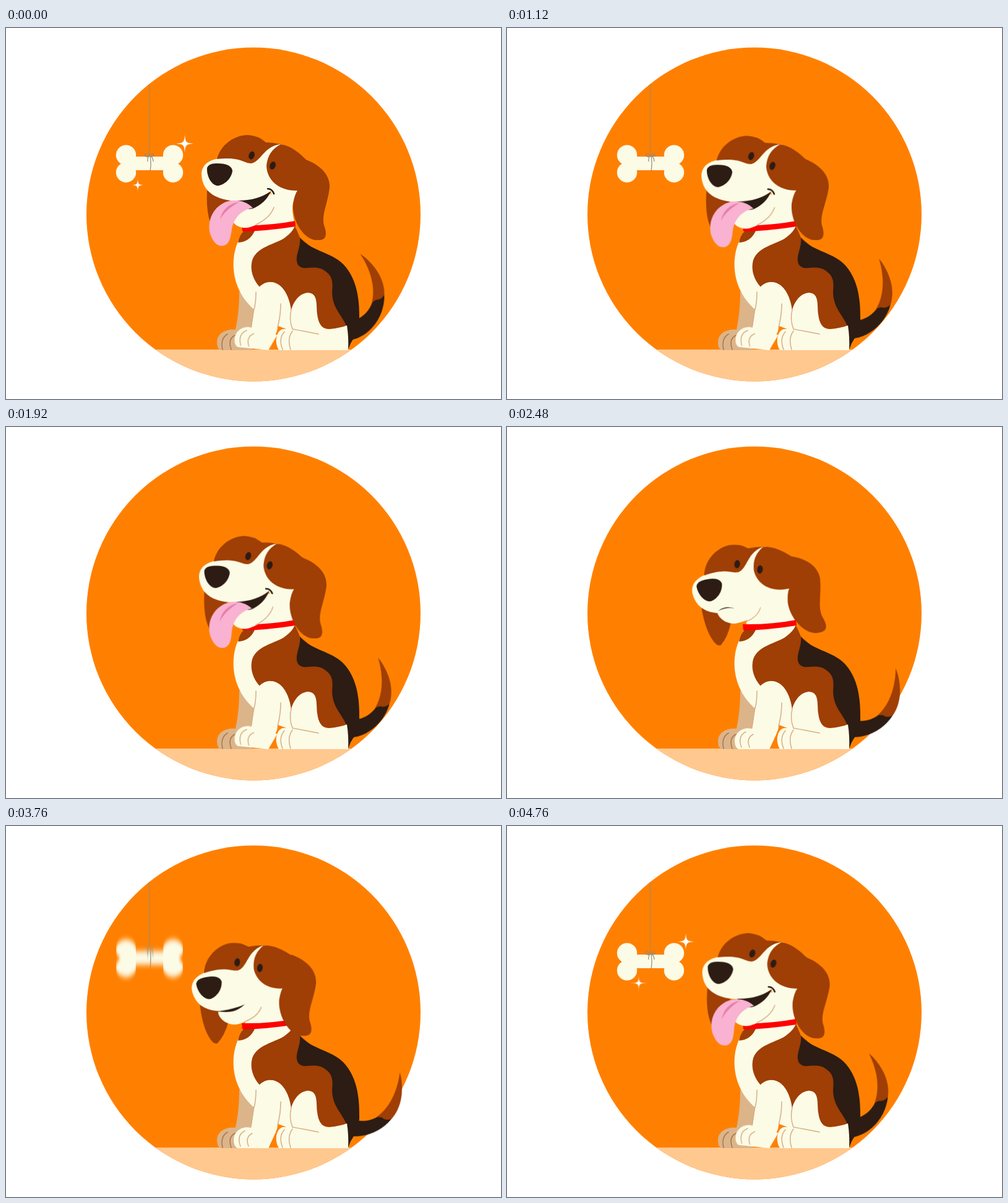
Write an HTML page without scripts that moves like this. It is 800 by 600 pixels and loops after 4.8 s.

```html
<!DOCTYPE html>
<html lang="en">
<head>
<meta charset="utf-8">
<title>Puppy and bone</title>
<style>
html, body { margin: 0; width: 100%; height: 100%; overflow: hidden; background: #fff; }
svg { display: block; width: 100vw; height: 100vh; }

.cream { fill: #fcfbe6; }
.brown { fill: #9f3e05; }
.dark { fill: #2c1c13; }
.tan { fill: #dcb48a; }
.line { fill: none; stroke: #d6ae84; stroke-width: 1.5; stroke-linecap: round; }
.toes { stroke: #a8764c; }

.move { animation: 4.8s ease-in-out infinite; }
.head { transform-origin: 455px 325px; animation-name: nod; }
.ear { transform-origin: 485px 225px; animation-name: near-ear; }
.far-ear { transform-origin: 350px 225px; animation-name: far-ear; }
.tail { transform-origin: 560px 468px; animation-name: wag; animation-delay: -4.76s; }
.paw { transform-origin: 424px 520px; animation-name: tap; }
.far-paw { transform-origin: 398px 520px; animation-name: far-tap; }
.tongue { transform-origin: 392px 284px; animation-name: pant; }
.jaw { animation-name: jaw; }
.cheek { animation-name: cheek; }
.mouth { animation-name: mouth; }
.corner { animation-name: corner; }
.bone { animation-name: hang; }
.sharp { animation-name: sharp; animation-timing-function: step-end; }
.blurred { animation-name: blurred; animation-timing-function: step-end; }
.star-a { transform-origin: 289px 187px; animation-name: star-a; }
.star-b { transform-origin: 213px 254px; animation-name: star-b; }
.star-c { transform-origin: 208px 185px; animation-name: star-c; }

@keyframes nod {
  0%, 12.5%, 25%, 37.5%, 87.5%, 100% { transform: rotate(0deg); }
  6.25%, 18.75%, 31.25%, 43.75% { transform: rotate(-8deg); }
  47.2% { transform: rotate(-3deg); }
  53.3% { transform: rotate(-14.5deg); }
  75% { transform: rotate(-14deg); }
  93.4% { transform: rotate(-8.5deg); }
}
@keyframes near-ear {
  0%, 100% { transform: rotate(0deg); }
  4.2%, 19%, 94% { transform: rotate(8deg); }
  9.4%, 25%, 38%, 84%, 99.17% { transform: rotate(2deg); }
  14.17%, 31.67%, 44% { transform: rotate(7.3deg); }
  51.67% { transform: rotate(1deg); }
  58%, 78.33% { transform: rotate(13deg); }
  90% { transform: rotate(4deg); }
}
@keyframes far-ear {
  0%, 51.67%, 70%, 100% { transform: rotate(0deg); }
  5%, 84% { transform: rotate(7deg); }
  11%, 25%, 38%, 99.17% { transform: rotate(1.5deg); }
  14.17%, 19%, 31.67%, 44%, 90% { transform: rotate(6deg); }
  78.33% { transform: rotate(2deg); }
}
@keyframes wag {
  0%, 8.33%, 16.67%, 25%, 33.33%, 41.67%, 83.33%, 91.67%, 100% { transform: rotate(-1.5deg); }
  4.17%, 12.5%, 20.83%, 29.17%, 37.5%, 45.83%, 87.5%, 95.83% { transform: rotate(27deg); }
  55.83%, 76.67% { transform: rotate(43deg); }
}
@keyframes tap {
  0%, 8.3%, 15.8%, 25%, 32.5%, 41.7%, 84%, 91.7%, 98.8%, 100% { transform: rotate(6deg); }
  12%, 14.5%, 28.7%, 31.2%, 45%, 80%, 95.3%, 97.5% { transform: rotate(0deg); }
}
@keyframes far-tap {
  0%, 8.3%, 15.8%, 25%, 32.5%, 91.7%, 98.8%, 100% { transform: rotate(0deg); }
  12%, 14.5%, 28.7%, 31.7%, 95.3%, 97.5% { transform: rotate(5deg); }
}
@keyframes pant {
  0%, 14.17%, 24%, 40%, 46%, 100% { transform: none; }
  7%, 19% { transform: rotate(-3deg); }
  31.67% { transform: rotate(4deg); }
  49.5%, 80% { transform: scale(0); }
  90% { transform: scale(.87); }
  99.17% { transform: rotate(-3deg); }
}
@keyframes jaw {
  0%, 46.5%, 83%, 100% { d: path("M366 312C370 320 380 324 390 323C410 319 428 305 433 290L428 268L385 285Z"); }
  51%, 75% { d: path("M348 274C349 288 362 298 374 299C392 300 410 294 418 283L428 268L352 270Z"); }
  78.33% { d: path("M350 279C350 292 362 303 376 304C392 304 412 296 420 285L428 268L355 275Z"); }
}
@keyframes cheek {
  0%, 46.5%, 83%, 100% { d: path("M433 290Q427 307 404 318"); }
  51%, 75% { d: path("M418 283Q410 297 389 300"); }
  78.33% { d: path("M420 285Q411 299 390 302"); }
}
@keyframes mouth {
  0%, 46.5%, 83%, 100% { d: path("M372 279Q405 280 428 264Q420 283 399 292Q385 296 372 279Z"); }
  51%, 75% { d: path("M350 273Q363 266 377 275Q370 271 363 271.5Q356 271 350 273Z"); }
  78.33% { d: path("M350 277Q376 279 395 275Q385 281 375 282Q362 282 350 277Z"); }
}
@keyframes corner {
  0%, 47%, 83%, 100% { opacity: 1; }
  49%, 80% { opacity: 0; }
}
@keyframes hang {
  0%, 24.2%, 86.7%, 100% { transform: translateY(0); }
  30.83%, 80.92% { transform: translateY(38px); }
  40%, 71.67% { transform: translateY(-235px); }
}
@keyframes sharp {
  0%, 29.6%, 80.2% { opacity: 1; }
  25.8%, 31.3% { opacity: 0; }
}
@keyframes blurred {
  0%, 29.6%, 80.2% { opacity: 0; }
  25.8%, 31.3% { opacity: 1; }
}
@keyframes star-a {
  0%, 100% { transform: scale(1); }
  2.5% { transform: scale(1.25); }
  9%, 94% { transform: scale(0); }
  99.17% { transform: scale(.94); }
}
@keyframes star-b {
  0%, 100% { transform: scale(1); }
  6%, 94% { transform: scale(0); }
  98.5% { transform: scale(1.07); }
}
@keyframes star-c {
  0%, 99.17%, 100% { transform: scale(.08); }
  .8%, 86% { transform: scale(0); }
  90% { transform: scale(1); }
  92.5% { transform: scale(1.25); }
}
</style>
</head>
<body>
<svg viewBox="0 0 800 600">
  <defs>
    <clipPath id="disc"><circle cx="400" cy="301.5" r="270"/></clipPath>
    <filter id="smear" x="-10%" y="-10%" width="120%" height="120%"><feGaussianBlur stdDeviation="0 5"/></filter>
    <g id="bone">
      <path d="M231.5 -160V205" fill="none" stroke="#8f897b" stroke-width="1.1" opacity=".75"/>
      <g class="cream">
        <circle cx="194" cy="205.5" r="16.2"/><circle cx="194" cy="233.5" r="16.2"/>
        <circle cx="270" cy="205.5" r="16.2"/><circle cx="270" cy="233.5" r="16.2"/>
        <path d="M194 208H270V230H194Z"/>
      </g>
      <path d="M232 207q-8-7-8-1q3 4 8 1q7-7 7-1q-3 3-7 1M231 207q-3 5-2 9M234 207q4 4 4 9M233 208q2 10 0 23" fill="none" stroke="#8f897b" stroke-width="1.2"/>
    </g>
    <path id="star" d="M0-14C1-2 2-1 14 0C2 1 1 2 0 14C-1 2-2 1-14 0C-2-1-1-2 0-14Z" fill="#fff"/>
    <path id="thin-star" d="M0-16C0 0 0 0 16 0C0 0 0 0 0 16C0 0 0 0-16 0C0 0 0 0 0-16Z" fill="#fff"/>
  </defs>

  <g clip-path="url(#disc)">
    <path d="M130 30H670V573H130Z" fill="#ff8000"/>
    <path d="M130 520H670V573H130Z" fill="#ffc88f"/>
    <g class="move bone">
      <use class="move sharp" href="#bone"/>
      <use class="move blurred" href="#bone" filter="url(#smear)"/>
    </g>
  </g>
  <g class="move star-a"><use href="#star" x="289" y="187"/></g>
  <g class="move star-b"><use href="#thin-star" x="213" y="254"/></g>
  <g class="move star-c"><use href="#star" x="208" y="185"/></g>

  <g class="move tail">
    <path class="dark" d="M592 442Q586 462 566 472L550 480V505C580 506 613 472 611 430Z"/>
    <path class="brown" d="M571 365C594 380 612 406 611 431Q605 440 598 439Q594 441 591 444C597 418 588 390 571 365Z"/>
  </g>

  <g class="move head">
    <path class="brown move far-ear" d="M350 225L325 262C324 280 325 300 330 314Q335 329 342 328Q356 318 366 296Z"/>
  </g>

  <!-- Body -->
  <path class="tan" d="M377 426C377 450 375 470 370 492L380 516H400L404 452Z"/>
  <g class="move far-paw">
    <path class="tan" d="M372 488C355 486 341 494 341 508Q341 519 347 521H398L392 492Z"/>
    <path class="line toes" d="M358 495Q346 502 350 520M370 497Q358 503 364 520"/>
  </g>
  <path class="cream" d="M396 270H463Q461 295 467 318L475 350L530 480L462 490L440 482L402 456C364 424 361 375 376 343L386 322Z"/>
  <path class="brown" d="M467 320L475 339L530 385L560 480C538 486 526 489 514 485L461 460C460 438 448 411 428 411Q416 412 410 419C399 407 395 392 397 380C401 353 438 350 452 338Q463 330 467 320Z"/>
  <path class="brown" d="M375 347Q377 336 384 328H402Q394 346 375 347Z"/>
  <path class="dark" d="M475 339C491 360 525 362 545 382C565 403 572 433 571 474Q569 492 557 510L553 520V490C546 465 528 457 527 428C529 408 527 399 511 390C494 383 481 394 472 383C465 370 477 356 475 339Z"/>
  <path class="cream" d="M459 486C455 460 466 430 488 428C505 429 501 448 503 463C505 480 512 488 523 487Q540 485 551 481Q554 500 553 521H441C433 507 437 490 447 487Z"/>
  <path class="line" d="M461 455Q457 472 463 487Q480 490 505 495M450 491Q440 502 447 520M463 490Q454 502 460 520"/>
  <path class="cream" d="M410 418Q428 402 447 421L460 460L444 455L438 490L424 521L396 490L402 450Z"/>
  <path class="line" d="M404 427Q404 446 400 458L396 485M444 446Q444 464 439 484"/>
  <g class="move paw">
    <path class="cream" d="M396 488C380 484 368 495 368 508Q368 518 374 521H424L436 495Z"/>
    <path class="line" d="M386 493Q372 500 379 518M398 497Q386 503 392 518"/>
  </g>
  <path d="M381 319Q425 320 467 312L468 321Q425 328 382 329Z" fill="#f00"/>

  <g class="move head">
    <path class="cream move jaw" d="M366 312C370 320 380 324 390 323C410 319 428 305 433 290L428 268L385 285Z"/>
    <path class="cream" d="M316 237C316 218 334 209 360 210L400 200L430 188L446 188L485 235L471 263Q461 285 463 298L432 291L428 264Q405 280 375 280C340 279 317 265 316 237Z"/>
    <path class="brown" d="M341 212C347 188 370 173 391 173Q408 174 420 185Q432 185 444 188C416 191 413 216 396 219C384 219 380 208 341 212Z"/>
    <path class="brown" d="M444 188C462 191 475 203 485 213L500 240L472 263C440 264 421 245 421 222C423 205 430 196 444 188Z"/>
    <path class="line move cheek" d="M433 290Q427 307 404 318"/>
    <path class="dark move mouth" d="M372 279Q405 280 428 264Q420 283 399 292Q385 296 372 279Z"/>
    <path class="move corner" d="M423 260Q430 260 433 268" fill="none" stroke="#2c1c13" stroke-width="2.5" stroke-linecap="round"/>
    <g class="move tongue">
      <path d="M399 291C385 276 362 276 350 284C332 294 325 315 330 333C335 348 343 354 352 352C362 349 363 338 365 325C368 307 382 293 399 291Z" fill="#f9b2d1"/>
      <path d="M377 281C360 284 349 294 346 310Q353 295 377 281Z" fill="#e57fa9"/>
    </g>
    <path class="dark" d="M325 226Q328 218 342 219Q364 219 366 231C364 246 350 255 342 255C331 254 324 238 325 226Z"/>
    <ellipse class="dark" cx="397" cy="206" rx="4.6" ry="6.6" transform="rotate(20 397 206)"/>
    <ellipse class="dark" cx="431" cy="222.5" rx="4.6" ry="6.6" transform="rotate(20 431 222.5)"/>
    <path class="brown move ear" d="M482 212C505 220 524 235 523 258C520 285 508 305 515 322C520 338 515 344 502 343C480 342 462 310 464 285Q466 270 471 263Z"/>
  </g>
</svg>
</body>
</html>
```
